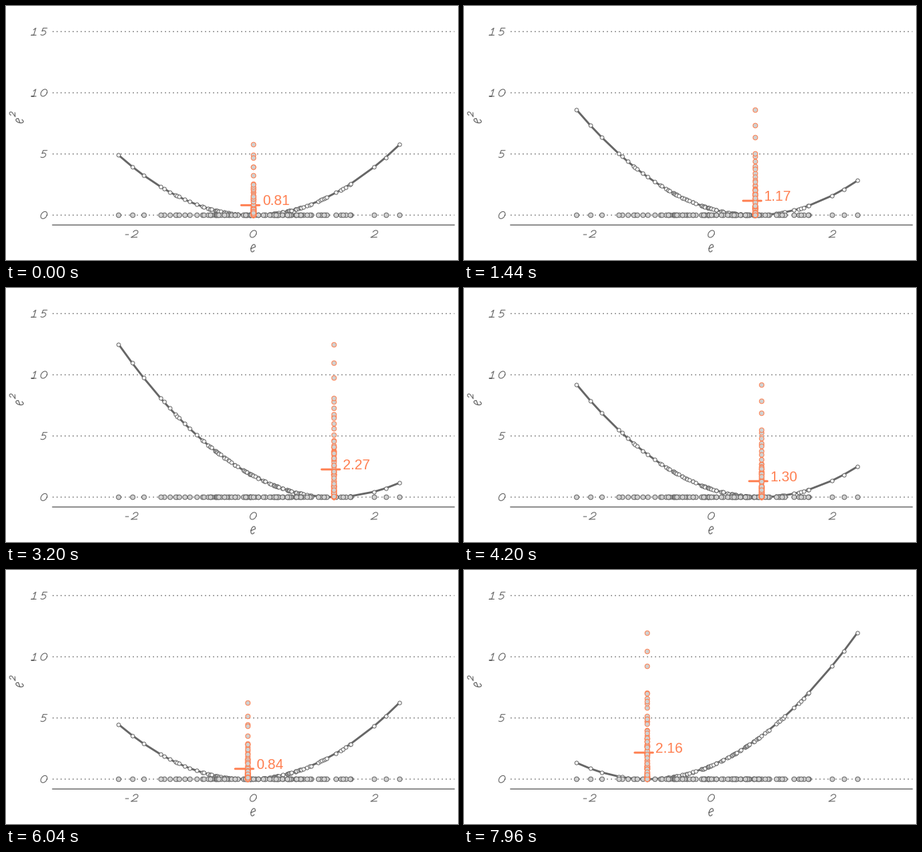
These frames come from a looping animation (640 px wide and 360 px high, 8000 ms). A matplotlib script:

```python
import math
import random

import numpy as np
import matplotlib.pyplot as plt
from matplotlib.animation import FuncAnimation

W, H, DPI = 640, 360, 100
FRAMES, INTERVAL = 200, 40
PX = 72 / DPI                      # points per pixel
GREY, FILL, CORAL = "#666666", "#d0d0d0", "#ff7f50"
X0, Y0, SX, SY = 350.3, 296.4, 86.2, 17.34
LEFT, RIGHT = 66, 634.7


def seeded_normals(seed, n):
    """Mersenne Twister draws turned into normals by inversion."""
    key = []
    for i in range(675):
        seed = (69069 * seed + 1) % 2**32
        if i > 50:
            key.append(seed)
    rng = random.Random(0)
    rng.setstate((3, tuple(key) + (624,), None))
    big = 2**27

    def uniform():
        return rng.getrandbits(32) / 2**32

    def inverse(p):
        lo, hi = -6.0, 6.0
        for _ in range(50):
            mid = (lo + hi) / 2
            if 0.5 * math.erfc(-mid / math.sqrt(2)) < p:
                lo = mid
            else:
                hi = mid
        return (lo + hi) / 2

    return np.array([inverse((int(big * uniform()) + uniform()) / big)
                     for _ in range(n)])


def px(x):
    return X0 + SX * x


def py(y):
    return Y0 - SY * y


def arc(cx, cy, rx, ry, start, end):
    a = np.radians(np.linspace(start, end, 40))
    return np.column_stack([cx + rx * np.cos(a), cy + ry * np.sin(a)])


def pen(*parts):
    return np.vstack(parts)


# pen strokes in a unit box, y up; write() slants them
GLYPHS = {
    "0": arc(.5, .5, .5, .5, 0, 360),
    "1": pen((.2, .75), (.5, 1), (.5, 0), (.1, 0), (.9, 0)),
    "2": pen(arc(.5, .7, .4, .3, 170, -40), (0, 0), (1, .04)),
    "5": pen((.85, 1), (.2, 1), (.15, .55), arc(.4, .32, .45, .32, 100, -130)),
    "-": pen((0, .4), (1, .4)),
    "e": pen((.08, .45), arc(.5, .5, .45, .5, 20, 320)),
}


def write(char, x, y, w, h, turned=False, lw=1.1):
    """Draw a slanted character with its lower left corner at x, y."""
    u, v = GLYPHS[char].T
    u = (u + 0.35 * v) / 1.35
    if turned:
        xs, ys = x - h * v, y - w * u
    else:
        xs, ys = x + w * u, y - h * v
    stroke(xs, ys, GREY, lw, 2, solid_capstyle="round")


def stroke(x, y, color, lw, z, **style):
    line, = ax.plot(x, y, color=color, lw=lw * PX, zorder=z, **style)
    line.set_snap(False)
    return line


def dots(x, y, size, edge, face, z):
    return stroke(x, y, edge, 0, z, marker="o", ms=size * PX, mec=edge,
                  mfc=face, mew=PX)


fig = plt.figure(figsize=(W / DPI, H / DPI), dpi=DPI, facecolor="white")
ax = fig.add_axes([0, 0, 1, 1])
ax.set_xlim(0, W)
ax.set_ylim(H, 0)
ax.axis("off")

# grid, axis and labels
for value in (0, 5, 10, 15):
    y = py(value)
    stroke([LEFT, RIGHT], [y, y], GREY, 1.42, 1,
           ls=(0, (1, 3)), dash_capstyle="butt")
    for i, char in enumerate(reversed(str(value))):
        write(char, 48 - 13 * i, y + 5, 11.5, 10)
stroke([LEFT, RIGHT], [310.4, 310.4], GREY, 1.42, 1)
write("-", 168.5, 328, 6, 10)
for char, x in (("2", 177), ("0", 344.3), ("2", 516.5)):
    write(char, x, 328, 11.5, 10)
write("e", 345.5, 348.5, 8.8, 10.5, lw=1.2)
write("e", 24.5, 167, 8.8, 10.5, turned=True, lw=1.2)
write("2", 13, 157, 8, 8, turned=True)

# data and moving parts
errors = seeded_normals(1, 100)
ordered = np.sort(errors)
curve = stroke([], [], GREY, 2.8, 3, solid_capstyle="butt")
knots = dots([], [], 5.2, GREY, "white", 4)
dots(px(errors), np.full(len(errors), Y0), 6.6, GREY, FILL, 5)
mean_bar = stroke([], [], CORAL, 2.9, 6, solid_capstyle="round")
column = dots([], [], 6.6, CORAL, FILL, 7)
readout = ax.text(0, 0, "", color=CORAL, family="Liberation Sans",
                  size=19.9 * PX, ha="left", va="baseline", zorder=8)


def centre(k):
    """Rise to 1.5, then come back down from 1.4."""
    return 0.02 * k if k <= 75 else 1.4 - 0.02 * (k - 76)


def draw(k):
    c = centre(k)
    squares = (errors - c) ** 2
    mean = squares.mean()
    x = px(c)
    curve.set_data(px(ordered), py((ordered - c) ** 2))
    knots.set_data(px(ordered), py((ordered - c) ** 2))
    column.set_data(np.full(len(errors), x), py(squares))
    mean_bar.set_data([px(c - 0.2), px(c + 0.1)], [py(mean)] * 2)
    readout.set_position((x + 12.5, py(mean)))
    readout.set_text(f"{mean:.2f}")
    return curve, knots, column, mean_bar, readout


anim = FuncAnimation(fig, draw, frames=FRAMES, interval=INTERVAL,
                     repeat=True, repeat_delay=0, blit=False)
plt.show()
```
